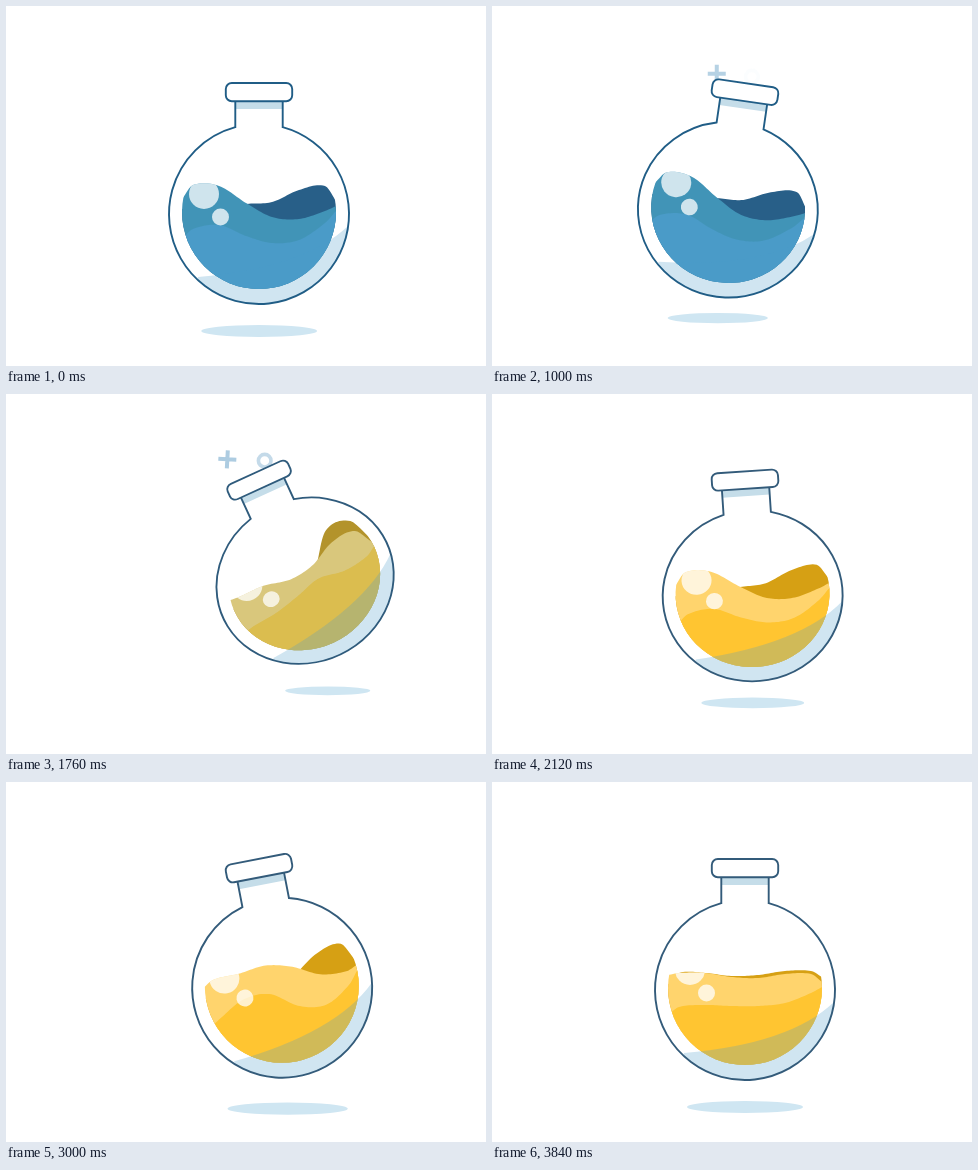
Animation, 480 px wide and 360 px high, one loop 3880 ms. Source, as an HTML page with a canvas:

```html
<!DOCTYPE html>
<html lang="en">
<head>
<meta charset="utf-8">
<title>Swinging flask</title>
<style>
  html, body { margin: 0; width: 100%; height: 100%; overflow: hidden; background: #fff; }
  canvas { display: block; }
</style>
</head>
<body>
<canvas width="480" height="360"></canvas>
<script>
const ctx = document.querySelector('canvas').getContext('2d');
const LOOP = 3880, TAU = Math.PI * 2;

const clamp = v => Math.max(0, Math.min(1, v));
const mix = (a, b, p) => a.map((v, i) => v + (b[i] - v) * p);

// Keys are [time, values]; sine easing between neighbours.
function tween(keys, t) {
  const next = keys.findIndex(k => k[0] > t);
  if (next < 0) return keys[keys.length - 1][1];
  const [t0, a] = keys[next - 1], [t1, b] = keys[next];
  return mix(a, b, (1 - Math.cos(Math.PI * (t - t0) / (t1 - t0))) / 2);
}

// Smooth curve through the points (xs, ys).
function spline(xs, ys, x) {
  const last = xs.length - 1;
  let i = 0;
  while (i < last - 1 && x > xs[i + 1]) i++;
  const slope = j => {
    const a = Math.max(0, j - 1), b = Math.min(last, j + 1);
    return (ys[b] - ys[a]) / (xs[b] - xs[a]);
  };
  const w = xs[i + 1] - xs[i], u = clamp((x - xs[i]) / w), v = 1 - u;
  return v * v * (1 + 2 * u) * ys[i] + u * u * (1 + 2 * v) * ys[i + 1]
    + w * u * v * (v * slope(i) - u * slope(i + 1));
}

// [angle in degrees, squash along the flask]
const swing = [
  [0, [0, 1]], [600, [-26, .905]], [1210, [20.5, 1]], [1830, [-26, .905]],
  [2425, [20, 1]], [3120, [-13.3, 1]], [3470, [12.8, 1]], [3840, [0, 1]]
];

const shadow = {
  time: [0, 360, 600, 1000, 1220, 1830, 2440, 3120, 3470, 3840],
  x: [253, 312, 326, 226, 182, 326, 182, 294, 218, 253],
  y: [325, 312, 298, 312, 325, 296, 327, 326, 325, 325],
  r: [58, 39, 40, 50, 63, 42, 64, 59, 58, 58]
};

// Surface heights: front wave, back wave, lower band.
const waveX = [-77, -66, -40, -13, 13, 40, 66, 77];
const waveEnds = [[-15, -8], [-5, -13], [25, -3]];
const leftCrest = [-29, -28, -11, 3, 5, -3, -5, -5, -10, -12, -24, -28, 15, 11, 22, 29, 26, 9];
const rightCrest = [-16, -14, -7, -14, -27, -23, 0, 0, -3, -30, -48, -38, 24, 23, 19, 13, 6, 0];
const steep = [-14, -14, -8, -12, -26, -27, 0, 0, 0, -7, -41, -39, 22, 19, 12, 4, 8, 4];
const high = [-13, -15, -7, -17, -31, -27, 0, 0, -5, -30, -53, -44, 27, 27, 20, 14, 5, -2];
const settling = [-21, -22, -25, -19, -6, -4, 0, 0, -5, -10, -27, -32, 18, 4, 4, 21, 25, 10];
const calm = [-17, -17, -13, -12, -16, -16, -17, -17, -14, -15, -19, -19, 17, 15, 16, 16, 13, 3];
const slosh = [
  [0, leftCrest], [380, rightCrest], [1000, leftCrest], [1760, steep],
  [2120, leftCrest], [2480, high], [3000, settling], [3840, calm]
];

const blue = { front: [65, 148, 183], back: [40, 95, 136], band: [74, 155, 200], line: [32, 93, 134] };
const gold = { front: [255, 212, 109], back: [214, 160, 20], band: [255, 197, 49], line: [51, 91, 122] };

function disc(x, y, r, ry = r) {
  ctx.beginPath();
  ctx.ellipse(x, y, r, ry, 0, 0, TAU);
}

function drawShadow(t) {
  const at = name => spline(shadow.time, shadow[name], t), r = at('r');
  ctx.fillStyle = '#cfe6f2';
  disc(at('x'), at('y'), r, r / 9.7);
  ctx.fill();
}

function drawSparks(t) {
  const age = (t - 155) % 745;
  if (t < 155 || age > 430) return;
  const rise = 1 - Math.exp(-(age - 100) / 140);
  const fade = clamp((430 - age) / 100);
  ctx.save();
  ctx.strokeStyle = '#adcce1';
  ctx.lineWidth = 4;
  ctx.globalAlpha = fade * clamp((age - 70) / 35);
  ctx.translate(225 - 34 * rise, 68 - 25 * rise);
  ctx.rotate(rise * .5);
  ctx.beginPath();
  ctx.moveTo(-9, 0); ctx.lineTo(9, 0);
  ctx.moveTo(0, -9); ctx.lineTo(0, 9);
  ctx.stroke();
  ctx.restore();

  ctx.save();
  ctx.strokeStyle = '#adcce1';
  ctx.lineWidth = 3.6;
  ctx.globalAlpha = fade * clamp((age - 100) / 22);
  disc(260 - 12 * rise, 71 - 40 * rise, 6.3);
  ctx.stroke();
  ctx.restore();
}

function wavePath(heights, ends) {
  const ys = [ends[0], ...heights, ends[1]];
  ctx.beginPath();
  ctx.moveTo(-80, 90);
  for (let x = -80; x <= 80; x += 2) ctx.lineTo(x, spline(waveX, ys, x));
  ctx.lineTo(80, 90);
  ctx.closePath();
}

function drawLiquid(t, color) {
  const heights = tween(slosh, t);
  const wave = (i, fill) => {
    wavePath(heights.slice(i * 6, i * 6 + 6), waveEnds[i]);
    ctx.fillStyle = fill;
    ctx.fill();
  };
  ctx.save();
  disc(0, -2, 77);
  ctx.clip();
  wave(1, color('back'));
  wave(0, color('front'));
  wave(2, color('band'));
  wavePath(heights.slice(0, 6), waveEnds[0]);
  ctx.clip();
  ctx.fillStyle = 'rgba(255,255,255,.75)';
  disc(-55, -20, 15);
  ctx.fill();
  disc(-38.5, 3, 8.5);
  ctx.fill();
  ctx.restore();
}

function drawFlask(t) {
  const p = clamp((t - 1200) / 700);
  const color = name => `rgb(${mix(blue[name], gold[name], p).map(Math.round)})`;
  const [angle, squash] = tween(swing, t);
  ctx.save();
  ctx.translate(253, 86);
  ctx.rotate(angle * Math.PI / 180);
  ctx.scale(1, squash);
  ctx.translate(0, 122);
  ctx.lineWidth = 1.9;
  ctx.strokeStyle = color('line');

  const neck = Math.asin(23.7 / 90), body = new Path2D();
  body.moveTo(23.7, -113);
  body.arc(0, 0, 90, neck - Math.PI / 2, 1.5 * Math.PI - neck);
  body.lineTo(-23.7, -113);
  ctx.fillStyle = '#fff';
  ctx.fill(body);
  ctx.fillStyle = '#c5dde9';
  ctx.fillRect(-23.7, -113, 47.4, 8);
  drawLiquid(t, color);

  ctx.save();
  ctx.clip(body);
  ctx.fillStyle = 'rgba(74,155,200,.26)';
  ctx.beginPath();
  ctx.moveTo(-61, 63);
  ctx.quadraticCurveTo(45, 54, 89, 12);
  ctx.lineTo(100, 100);
  ctx.lineTo(-70, 100);
  ctx.fill();
  ctx.restore();
  ctx.stroke(body);

  ctx.fillStyle = '#fff';
  ctx.beginPath();
  ctx.roundRect(-33.2, -131, 66.4, 18.3, 6);
  ctx.fill();
  ctx.stroke();
  ctx.restore();
}

function frame(now) {
  const t = now % LOOP;
  ctx.fillStyle = '#fff';
  ctx.fillRect(0, 0, 480, 360);
  drawShadow(t);
  drawSparks(t);
  drawFlask(t);
  requestAnimationFrame(frame);
}

const start = performance.now();
const tick = () => frame(Math.max(0, performance.now() - start));
frame = (draw => () => draw(Math.max(0, performance.now() - start)))(frame);
tick();
</script>
</body>
</html>
```
